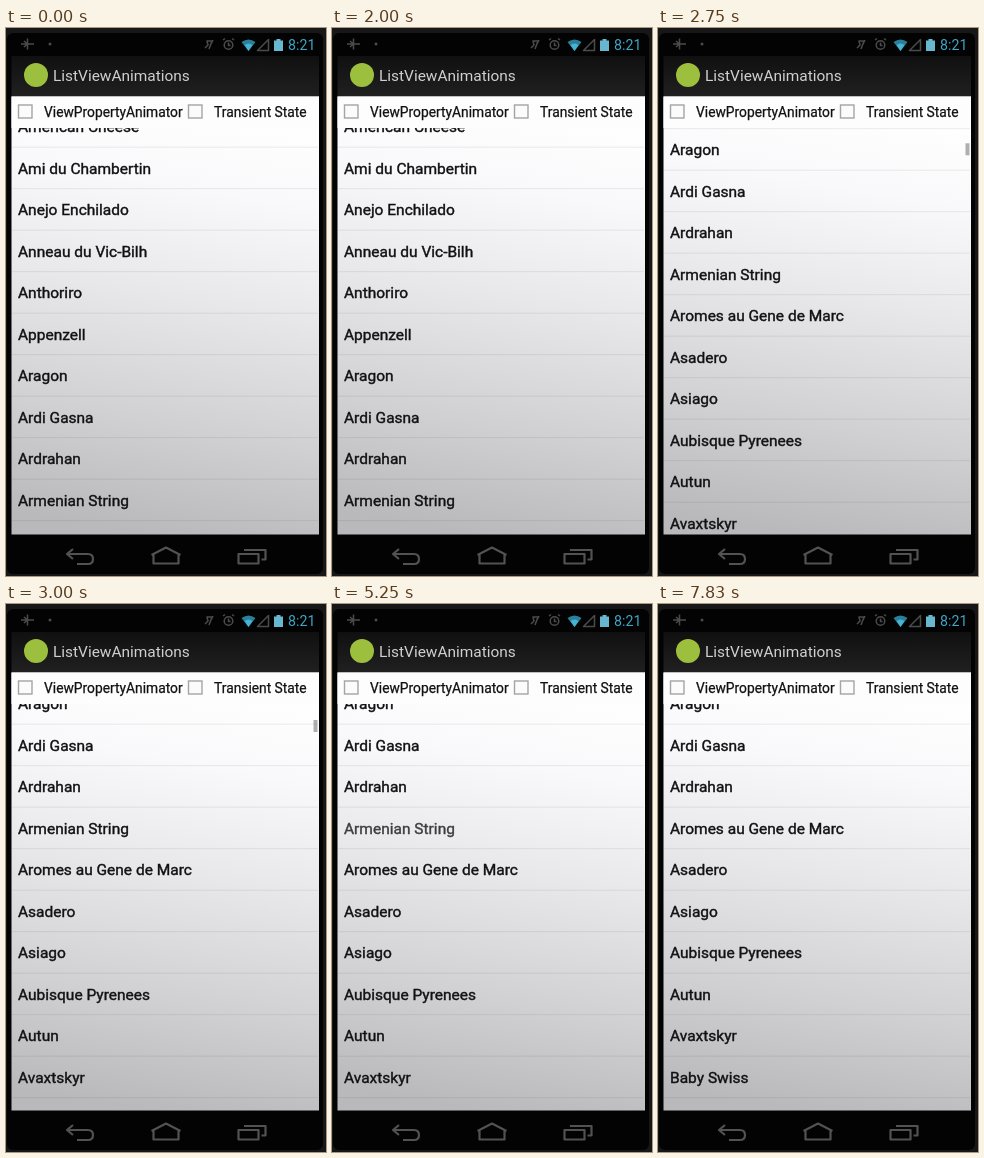
An HTML page for the animation above (8000 ms loop, 320x548 px).

```html
<!DOCTYPE html>
<html lang="en">
<head>
<meta charset="utf-8">
<title>List demo</title>
<style>
  html, body { margin: 0; width: 100%; height: 100%; overflow: hidden; background: #171717; }
  svg { display: block; width: 320px; height: 548px; filter: blur(.75px); }
  text { font-family: Roboto, sans-serif; }
  .row text { font-size: 15.5px; fill: #111113; stroke: #111113; stroke-width: .4px; }
  .row path { stroke: #000; stroke-opacity: .08; }
  .option { font-size: 13.8px; fill: #111113; stroke: #111113; stroke-width: .25px; }
  .box { fill: #fbfbfb; stroke: #a4a4a4; stroke-width: 1.4; }
  .line { fill: none; stroke-linejoin: round; }
</style>
</head>
<body>
<svg viewBox="0 0 320 548">
  <defs>
    <linearGradient id="paper" x1=".56" y1="0" x2=".44" y2="1">
      <stop offset="0" stop-color="#fff"/>
      <stop offset=".2" stop-color="#f9f9fb"/>
      <stop offset=".45" stop-color="#e8e8ea"/>
      <stop offset=".75" stop-color="#d0d0d2"/>
      <stop offset="1" stop-color="#b9b9bb"/>
    </linearGradient>
    <linearGradient id="bar" x2="0" y2="1">
      <stop offset="0" stop-color="#101010"/>
      <stop offset="1" stop-color="#202020"/>
    </linearGradient>
    <clipPath id="view"><rect x="5" y="100" width="308" height="407"/></clipPath>
  </defs>

  <rect width="320" height="548" fill="#171717"/>
  <rect x="1" y="5" width="316" height="541" rx="6" fill="#030303"/>

  <!-- status bar -->
  <g class="line" stroke="#4b4b4b" stroke-width="1.5">
    <path d="M15 16h13M21.500 10.500v11M18 13l3.500 3l-3.500 3"/>
    <path d="M199 20l3-3l-1-4l5 0l-3 8M207 12l-2 4"/>
    <circle cx="222.500" cy="17" r="4.300"/>
    <path d="M222.500 14.500v3h2M217 12l2-1.500M228 12l-2-1.500"/>
    <path d="M251.500 22.500h11v-11z"/>
  </g>
  <circle cx="44" cy="16" r="1.500" fill="#4b4b4b"/>
  <path d="M235.500 14q7-5 14 0l-7 9z" fill="#2b7f99"/>
  <path d="M238.500 17q4-3 8 0l-4 6z" fill="#45b3d3"/>
  <path d="M268 12.500h2.500v-1.500h4v1.500h2.500v10.500h-9z" fill="#67b7d0"/>
  <text x="282" y="21.500" font-size="14.200" fill="#3fa6c8">8:21</text>

  <!-- action bar -->
  <rect x="5.500" y="28" width="307.500" height="40" fill="url(#bar)"/>
  <circle cx="30" cy="47" r="12" fill="#9cc03e"/>
  <text x="47" y="52.500" font-size="15.450" fill="#d0d0d0">ListViewAnimations</text>

  <!-- list -->
  <rect x="5.500" y="68.500" width="307.500" height="438" fill="url(#paper)"/>
  <g id="list" clip-path="url(#view)"></g>
  <rect id="thumb" x="307.500" width="4" height="12" fill="#8f8f91"/>

  <!-- options -->
  <rect x="5.500" y="68.500" width="307.500" height="31.500" fill="#fdfdfd"/>
  <rect class="box" x="12.500" y="77" width="13.500" height="13"/>
  <text class="option" x="38" y="89">ViewPropertyAnimator</text>
  <rect class="box" x="182.500" y="77" width="13.500" height="13"/>
  <text class="option" x="208" y="89">Transient State</text>

  <!-- navigation -->
  <g class="line" stroke="#525252" stroke-width="2.200">
    <path d="M67 521l-6 5l6 5M62 526h20q5 0 5 5t-5 5h-11"/>
    <path d="M145.500 527l14.500-7.500l14.500 7.500M147.500 526.500v9h25v-9"/>
    <path d="M232.500 526h20v9.500h-20zM238 522h21.500v9.500h-4"/>
  </g>
</svg>
<script>
const LOOP = 8000, PITCH = 41.5, FIRST = 98.5, TAPPED = 9, REMOVED_AT = 6170;
const names = ['American Cheese', 'Ami du Chambertin', 'Anejo Enchilado', 'Anneau du Vic-Bilh',
  'Anthoriro', 'Appenzell', 'Aragon', 'Ardi Gasna', 'Ardrahan', 'Armenian String',
  'Aromes au Gene de Marc', 'Asadero', 'Asiago', 'Aubisque Pyrenees', 'Autun',
  'Avaxtskyr', 'Baby Swiss'];

// [time, value] pairs; each value holds until the next time
const scrollSteps = [[0, 0], [2580, 72], [2670, 168], [2750, 226], [2830, 242], [2920, 247], [3000, 248]];
const thumbSteps = [[0, 0], [2580, .7], [3500, .3], [3580, 0]];
const hold = (steps, t) => steps.filter(s => s[0] <= t).pop()[1];

const list = document.getElementById('list');
const thumb = document.getElementById('thumb');
const make = (tag, parent, attrs) => {
  const el = document.createElementNS('http://www.w3.org/2000/svg', tag);
  for (const key in attrs) el.setAttribute(key, attrs[key]);
  return parent.appendChild(el);
};

const rows = names.map(name => {
  const row = make('g', list, { class: 'row' });
  const label = make('text', row, { x: 12, y: 5.5 });
  label.textContent = name;
  make('path', row, { d: 'M6 20.7H312' });
  return { row, label };
});

// accelerate, then decelerate, leaving a faint trace
function fade(t) {
  const p = Math.min(1, Math.max(0, (t - 4920) / 1080));
  return .04 + .96 * (1 + Math.cos(p * Math.PI)) / 2;
}

function draw(t) {
  const scroll = hold(scrollSteps, t);
  const removed = t >= REMOVED_AT;
  rows.forEach(({ row }, i) => {
    const slot = removed && i > TAPPED ? i - 1 : i;
    row.setAttribute('transform', `translate(0 ${FIRST + slot * PITCH - scroll})`);
  });
  rows[TAPPED].row.style.display = removed ? 'none' : '';
  rows[TAPPED].label.style.opacity = fade(t);
  thumb.setAttribute('y', 108 + scroll / 31);
  thumb.style.opacity = hold(thumbSteps, t);
}

const start = performance.now();
function tick() {
  draw((performance.now() - start) % LOOP);
  requestAnimationFrame(tick);
}
tick();
</script>
</body>
</html>
```
